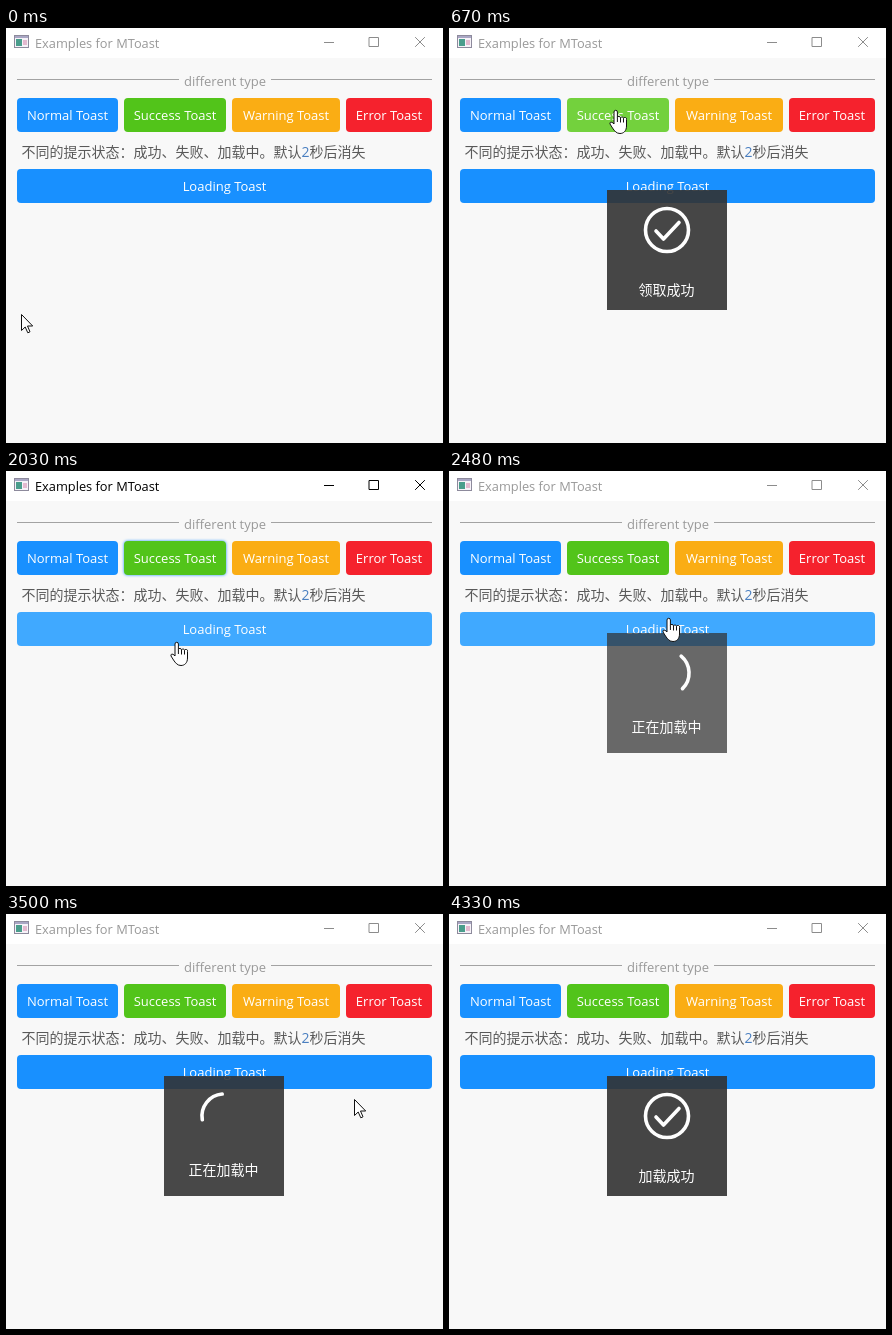
An HTML page that plays this animation: 437x415 px, repeating every 4530 ms.

```html
<!DOCTYPE html>
<html lang="zh-CN">
<head>
<meta charset="utf-8">
<title>Examples for MToast</title>
<style>
html, body { margin: 0; width: 100%; height: 100%; overflow: hidden; background: #f8f8f8; }
svg { display: block; }
text { font: 13px "Open Sans", "Noto Sans CJK SC", "Noto Sans CJK", sans-serif; }
.mid { text-anchor: middle; }
.cjk { font-size: 14px; }
.focus { filter: drop-shadow(0 0 1.5px #1890ff); }
#title { font-size: 12.8px; }
#controls { fill: none; stroke-linecap: square; }
#toast text { fill: #fff; }
#toast path, #toast circle { fill: none; stroke: #fff; stroke-width: 3.6; stroke-linecap: round; stroke-linejoin: round; }
#cursor path { fill: #fff; stroke: #111; stroke-linejoin: round; }
</style>
</head>
<body>
<svg width="437" height="415">
  <rect width="437" height="415" fill="#f8f8f8"/>
  <rect width="437" height="30" fill="#fff"/>
  <g id="icon">
    <rect x="8.5" y="7.5" width="14" height="12" fill="#f6f2f8" stroke="#8d8a9c"/>
    <rect x="9" y="8" width="13" height="2" fill="#a9a6c4"/>
    <rect x="10" y="11" width="6" height="7" fill="#4a9d8c"/>
    <rect x="17" y="12" width="4" height="5" fill="#e3b9cf"/>
  </g>
  <text id="title" x="29" y="19.5">Examples for MToast</text>
  <path id="controls" d="M318.5 14.5h9M363.5 9.5h9v9h-9zM409.5 9.5l9 9M418.5 9.5l-9 9"/>
  <path d="M11 51.5H173M265 51.5H426" stroke="#a3a3a3"/>
  <text class="mid" x="219" y="58" fill="#999">different type</text>
  <g id="buttons"></g>
  <text class="cjk" x="15.5" y="128.5" fill="#595959">不同的提示状态：成功、失败、加载中。默认<tspan fill="#4a7fc0">2</tspan>秒后消失</text>
  <g id="toast">
    <rect x="158" y="162" width="120" height="120" fill="#323232"/>
    <g id="done">
      <circle cx="218" cy="202" r="21.5"/>
      <path d="M207 203l7.5 8L230 194.5"/>
    </g>
    <path id="spinner" d="M217 180A22 22 0 0 1 240 203"/>
    <text id="message" class="mid cjk" x="217.5"></text>
  </g>
  <g id="cursor">
    <path id="arrow" d="M.5 .5V16.5L4.2 13L6.8 18.8L9 17.8L6.5 12H11.7Z"/>
    <path id="hand" d="M-2 13V1a1.7 1.7 0 0 1 3.4 0V6.5a1.6 1.6 0 0 1 3.1 .3a1.6 1.6 0 0 1 3 .7a1.5 1.5 0 0 1 3 1V15c0 5-3 7.5-6.5 7.5S-1.500 20-3.500 17L-6 13C-6.500 10.500-4 10.500-2 13ZM1.400 6.500V11M4.500 7V11.500M7.500 7.500V11.500"/>
  </g>
</svg>
<script>
const LOOP = 4530, STEP = 30, FADE = 190, TURN = 633, GAP = 6, HEIGHT = 34;
const $ = id => document.getElementById(id);
const clamp = v => Math.max(0, Math.min(1, v));
const easeOut = (k, power) => 1 - (1 - k) ** power;
const show = (el, on) => { el.style.display = on ? '' : 'none'; };

const buttons = [
  { label: 'Normal Toast', w: 101, color: '#1890ff', hover: '#40a9ff' },
  { label: 'Success Toast', w: 102, color: '#52c41a', hover: '#73d13d' },
  { label: 'Warning Toast', w: 108, color: '#faad14', hover: '#ffc53d' },
  { label: 'Error Toast', w: 86, color: '#f5222d', hover: '#ff4d4f' },
  { label: 'Loading Toast', w: 415, color: '#1890ff', hover: '#40a9ff' }
];

// Flow the buttons from left to right, wrapping at the right margin.
let left = 11, top_ = 70;
for (const b of buttons) {
  if (left + b.w > 426) [left, top_] = [11, 141];
  Object.assign(b, { x: left, y: top_ });
  left += b.w + GAP;
}
$('buttons').innerHTML = buttons.map(b =>
  `<rect x="${b.x}" y="${b.y}" width="${b.w}" height="${HEIGHT}" rx="4"/>
   <text class="mid" x="${b.x + b.w / 2}" y="${b.y + 22}" fill="#fff">${b.label}</text>`).join('');
const rects = document.querySelectorAll('#buttons rect');

// Pointer glides: x runs evenly, y eases out, which bends the path.
const start = { x: 15, y: 286 };
const glides = [
  { from: 18, to: 228, x: 167, y: 83, bend: 4 },
  { from: 1200, to: 1400, x: 61, y: 237, bend: 4 },
  { from: 1400, to: 1610, x: 53, y: 274, bend: 2 },
  { from: 1790, to: 2030, x: 171, y: 172, bend: 1 },
  { from: 2030, to: 2270, x: 220, y: 148, bend: 2 },
  { from: 2560, to: 2870, x: 348, y: 185, bend: 2 },
  { from: 3980, to: 4310, x: 401, y: 420, bend: 1 }
];

const toasts = [
  { text: '领取成功', from: 480, until: 1780 },
  { text: '正在加载中', from: 2400, until: 3455, loading: true },
  { text: '加载成功', from: 3645, until: Infinity }
];

function pointer(t) {
  let { x, y } = start;
  for (const g of glides) {
    const k = clamp((t - g.from) / (g.to - g.from));
    x += (g.x - x) * k;
    y += (g.y - y) * easeOut(k, g.bend);
  }
  return [Math.round(x), Math.round(y)];
}

function drawToast(t) {
  const toast = toasts.find(o => t >= o.from && t < o.until + FADE);
  show($('toast'), toast);
  if (!toast) return;
  const { text, from, until, loading } = toast;
  const p = Math.min(clamp((t - from) / FADE), 1 - clamp((t - until) / FADE));
  $('toast').setAttribute('opacity', 0.9 * easeOut(p, 3));
  $('message').textContent = text;
  $('message').setAttribute('y', loading ? 260.5 : 266.5);
  show($('done'), !loading);
  show($('spinner'), loading);
  $('spinner').setAttribute('transform', `rotate(${(t - from - 5) / TURN * 360} 218 202)`);
}

function draw(t) {
  const active = (t >= 410 && t < 480) || (t >= 1970 && t < 2390);
  $('title').setAttribute('fill', active ? '#000' : '#999');
  $('controls').setAttribute('stroke', active ? '#000' : '#8c8c8c');

  const [x, y] = pointer(t);
  const focused = t < 2260 ? 1 : 4;
  let over = false;
  buttons.forEach((b, i) => {
    const hit = x >= b.x && x < b.x + b.w && y >= b.y && y < b.y + HEIGHT;
    over = over || hit;
    rects[i].setAttribute('fill', hit ? b.hover : b.color);
    rects[i].setAttribute('class', active && i === focused ? 'focus' : '');
  });
  $('cursor').setAttribute('transform', `translate(${x} ${y})`);
  show($('hand'), over);
  show($('arrow'), !over);
  drawToast(t);
}

function frame() {
  const t = performance.now() % LOOP;
  draw(Math.floor((t + 10) / STEP) * STEP - 10);
  requestAnimationFrame(frame);
}
frame();
</script>
</body>
</html>
```
